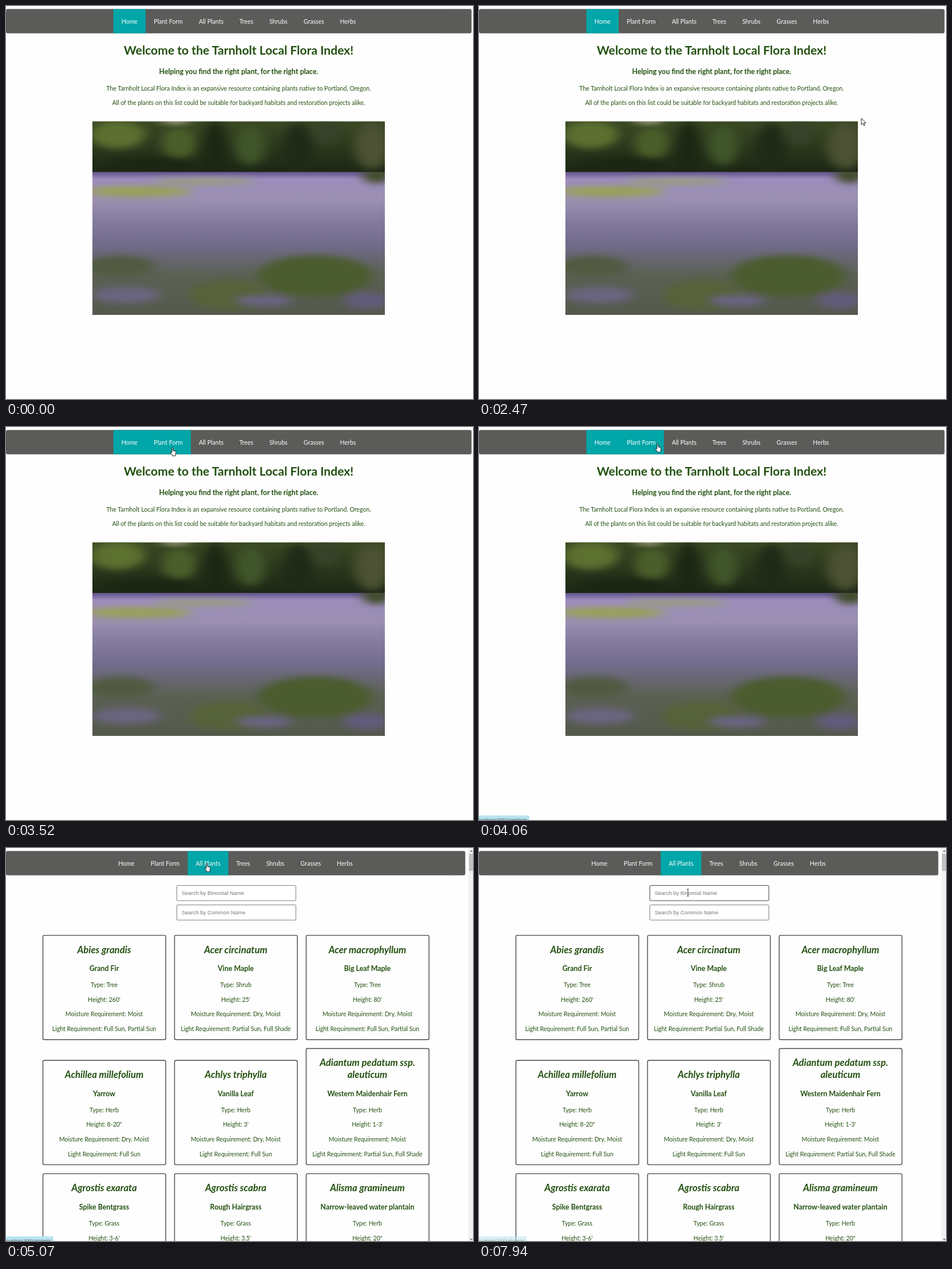
Write an HTML page that moves like this. It is 816 by 687 pixels and loops after 8 s.

```html
<!DOCTYPE html>
<html lang="en">
<head>
<meta charset="utf-8">
<title>Plant list</title>
<style>
  html, body { margin: 0; width: 816px; height: 687px; overflow: hidden; background: #fefefe; }
  svg { display: block; }
  text { font: 10.55px Lato, Carlito, sans-serif; fill: #22500f; text-anchor: middle; }
  .h1 { font-size: 21.1px; font-weight: 700; }
  .h2 { font-size: 16.7px; font-weight: 700; font-style: italic; }
  .h3 { font-size: 12.4px; font-weight: 700; }
  .nav { fill: #fff; }
  .hint { font: 9.45px "Liberation Sans", Arial, sans-serif; fill: #757575; text-anchor: start; }
  .status { font: 7.3px "Open Sans", sans-serif; fill: #3b5560; text-anchor: start; }
  .card { fill: none; stroke: #484848; stroke-width: 1.4; }
  .field { fill: #fff; stroke: #808080; }
</style>
</head>
<body>
<svg id="stage" width="816" height="687" viewBox="0 0 816 687">
  <defs>
    <linearGradient id="meadow" x2="0" y2="1">
      <stop offset="0" stop-color="#5f5088"/>
      <stop offset=".05" stop-color="#9c8dbd"/>
      <stop offset=".2" stop-color="#9a8fb0"/>
      <stop offset=".35" stop-color="#847a9f"/>
      <stop offset=".5" stop-color="#726c8c"/>
      <stop offset=".72" stop-color="#5c6154"/>
      <stop offset="1" stop-color="#54594c"/>
    </linearGradient>
    <linearGradient id="wood" x2="0" y2="1">
      <stop offset="0" stop-color="#3b4a24"/>
      <stop offset="1" stop-color="#1c2715"/>
    </linearGradient>
    <filter id="soft" x="-50%" y="-100%" width="200%" height="300%" color-interpolation-filters="sRGB">
      <feGaussianBlur stdDeviation="10 6"/>
    </filter>
    <clipPath id="woodFrame"><rect x="151" y="201.5" width="511" height="88.5"/></clipPath>
    <clipPath id="meadowFrame"><rect x="151" y="290" width="511" height="250"/></clipPath>
  </defs>
  <g id="home"></g>
  <g id="list"></g>
  <g id="status">
    <path id="tab" fill="#b9e4ef"/>
    <text id="url" class="status" x="-2" y="689"></text>
  </g>
  <circle id="click" cx="350" cy="27" r="8" fill="#a4d62c" opacity=".75"/>
  <path id="cursor" stroke-linejoin="round"/>
</svg>
<script>
const $ = id => document.getElementById(id);
const text = (x, y, s, cls = '') => `<text x="${x}" y="${y}" class="${cls}">${s}</text>`;
const rect = (x, y, w, h, attrs) => `<rect x="${x}" y="${y}" width="${w}" height="${h}" ${attrs}/>`;

// Navigation bar
const tabs = ['Home', 'Plant Form', 'All Plants', 'Trees', 'Shrubs', 'Grasses', 'Herbs'];
const edges = [187.7, 244, 323, 394, 446, 506, 570, 625];
const nav = (width, shift) => rect(0, 5.3, width, 42.5, 'rx="3" fill="#5b5b59"') +
  tabs.map((name, i) =>
    rect(edges[i] + shift, 5.3, edges[i + 1] - edges[i], 42.5, 'class="tab" fill="#00a6a8"') +
    text((edges[i] + edges[i + 1]) / 2 + shift, 30.5, name, 'nav')).join('');

// Landscape picture: soft patches as [x, y, rx, ry, colour]
const patches = list => list.map(([x, y, rx, ry, c]) =>
  `<ellipse cx="${x}" cy="${y}" rx="${rx}" ry="${ry}" fill="${c}" filter="url(#soft)"/>`).join('');
const trees = patches([
  [195, 225, 48, 24, '#5c7030'], [302, 240, 30, 28, '#4b5e2a'], [366, 250, 20, 50, '#1c2613'],
  [427, 244, 26, 34, '#40562a'], [510, 250, 26, 45, '#1f2a18'], [560, 222, 22, 22, '#36432a'],
  [640, 245, 32, 40, '#4c5233'], [296, 200, 26, 4, '#d8d6b0'], [250, 278, 80, 12, '#1c2613']
]);
const grass = patches([
  [230, 324, 95, 9, '#98a152'], [345, 307, 90, 5, '#98a070'], [648, 296, 26, 14, '#434d2c'],
  [540, 472, 100, 36, '#4b5c2e'], [390, 505, 70, 26, '#566239'], [200, 455, 60, 18, '#505a40'],
  [210, 505, 60, 14, '#6a6580'], [450, 515, 50, 10, '#6a6484'], [630, 515, 40, 14, '#625b7c']
]);

$('home').innerHTML = nav(813.5, 0) +
  text(406.5, 84.5, 'Welcome to the Tarnholt Local Flora Index!', 'h1') +
  text(406.5, 119, 'Helping you find the right plant, for the right place.', 'h3') +
  text(406.5, 147.5, 'The Tarnholt Local Flora Index is an expansive resource containing plants native to Portland, Oregon.') +
  text(406.5, 172.5, 'All of the plants on this list could be suitable for backyard habitats and restoration projects alike.') +
  `<g clip-path="url(#woodFrame)">${rect(151, 201.5, 511, 88.5, 'fill="url(#wood)"')}${trees}</g>
   <g clip-path="url(#meadowFrame)">${rect(151, 290, 511, 250, 'fill="url(#meadow)"')}${grass}</g>`;

// Plant cards: binomial (| breaks the line), common name, type, height, moisture, light
const plants = [
  ['Abies grandis', 'Grand Fir', 'Tree', "260'", 'Moist', 'Full Sun, Partial Sun'],
  ['Acer circinatum', 'Vine Maple', 'Shrub', "25'", 'Dry, Moist', 'Partial Sun, Full Shade'],
  ['Acer macrophyllum', 'Big Leaf Maple', 'Tree', "80'", 'Dry, Moist', 'Full Sun, Partial Sun'],
  ['Achillea millefolium', 'Yarrow', 'Herb', '8-20"', 'Dry, Moist', 'Full Sun'],
  ['Achlys triphylla', 'Vanilla Leaf', 'Herb', "3'", 'Dry, Moist', 'Full Sun'],
  ['Adiantum pedatum ssp.|aleuticum', 'Western Maidenhair Fern', 'Herb', "1-3'", 'Moist', 'Partial Sun, Full Shade'],
  ['Agrostis exarata', 'Spike Bentgrass', 'Grass', "3-6'", 'Moist', 'Full Sun'],
  ['Agrostis scabra', 'Rough Hairgrass', 'Grass', "3.5'", 'Dry, Moist', 'Full Sun'],
  ['Alisma gramineum', 'Narrow-leaved water plantain', 'Herb', '20"', 'Wet', 'Full Sun']
];
const labels = ['Type', 'Height', 'Moisture Requirement', 'Light Requirement'];
const card = ([binomial, common, ...facts], i) => {
  const x = 171.5 + i % 3 * 230, y = [0, 218.6, 416.8][Math.floor(i / 3)];
  const lines = binomial.split('|'), extra = (lines.length - 1) * 20.7;
  return rect(x - 107, 152.6 + y - extra, 214.6, 182.4 + extra, 'rx="2.5" class="card"') +
    lines.map((s, k) => text(x, 183.5 + y - extra + k * 20.7, s, 'h2')).join('') +
    text(x, 215.3 + y, common, 'h3') +
    facts.map((s, k) => text(x, 243.2 + y + k * 25.6, `${labels[k]}: ${s}`)).join('');
};
const field = (y, kind) => rect(298.5, y, 208, 26.5, 'rx="1" class="field"') +
  text(307, y + 16.5, `Search by ${kind} Name`, 'hint');

$('list').innerHTML = nav(802.5, -5.5) + field(65.5, 'Binomial') + field(99.5, 'Common') +
  plants.map(card).join('') +
  rect(808, 0, 8, 687, 'fill="#f1f1f1"') + rect(809, 10, 7, 30, 'fill="#c1c1c1"') +
  '<path d="M810.5 6.5l2.5-3 2.5 3zM810.5 683l2.5 3 2.5-3z" fill="#777"/>';

const homeTabs = document.querySelectorAll('#home .tab');
document.querySelectorAll('#list .tab').forEach((el, i) => el.setAttribute('opacity', +(i === 2)));
const firstField = document.querySelector('.field');

// Pointer moves: start, end, steps, target x, target y, easing power
const moves = [
  [650, 1400, 12, 678, 233, 1], [1470, 1540, 2, 670, 197, .8],
  [2470, 3240, 12, 390, 59, 2], [3310, 3520, 4, 291, 36, .6],
  [3720, 3790, 2, 288, 31, 1], [3990, 4410, 7, 351, 27, .77],
  [7590, 7940, 6, 365, 78, 1]
];
function pointer(t) {
  let x = 806, y = 716;
  for (const [start, end, steps, tx, ty, power] of moves) {
    if (t < start) break;
    const step = Math.floor((t - start) / (end - start) * (steps - 1) + 1e-6) + 1;
    const p = Math.min(1, step / steps) ** power;
    x += (tx - x) * p;
    y += (ty - y) * p;
  }
  return [x, y];
}

const shapes = {
  arrow: 'M0 0V11.5L2.7 9 4.5 13 6.2 12.2 4.5 8.4H8Z',
  hand: 'M-1 1Q-1 0 0 0T1 1V5.2L5 6.2Q6 6.5 6 7.8L5.2 12V14.5H-.5V13.2L-3.6 9Q-3.6 7.4-2.2 8L-1 9Z',
  beam: 'M-2-6H2M0-6V6M-2 6H2'
};
const show = (el, on) => el.setAttribute('visibility', on ? 'visible' : 'hidden');

function draw(t) {
  const onList = t >= 5070;
  const [x, y] = pointer(t);
  const inField = onList && y > 65 && y < 93;
  const hover = y < 48 ? edges.findIndex((e, i) => x >= e && x < edges[i + 1]) : -1;
  const shape = hover >= 0 ? 'hand' : inField ? 'beam' : 'arrow';

  $('home').style.display = onList ? 'none' : '';
  $('list').style.display = onList ? '' : 'none';
  homeTabs.forEach((el, i) => el.setAttribute('opacity', +(i === 0 || i === hover)));
  firstField.style.stroke = inField ? '#484848' : '';

  const form = t < 4130;
  $('tab').setAttribute('d', `M0 679H${form ? 86 : 81}q2 0 2 2V687H0Z`);
  $('url').textContent = 'localhost:3000/' + (form ? 'plantform' : 'allplants');
  $('status').setAttribute('opacity', t < 3720 ? 0 : t < 3790 ? .6 : t < 7870 ? 1 : t < 7940 ? .8 : .55);

  show($('click'), t >= 4940 && !onList);
  const cursor = $('cursor');
  show(cursor, t >= 650);
  cursor.setAttribute('d', shapes[shape]);
  cursor.setAttribute('fill', shape === 'beam' ? 'none' : '#fff');
  cursor.setAttribute('stroke', shape === 'beam' ? '#333' : '#111');
  cursor.setAttribute('stroke-width', .9);
  cursor.setAttribute('transform', `translate(${x} ${y})`);
}

const begin = performance.now();
function tick() {
  draw((performance.now() - begin) % 8000);
  requestAnimationFrame(tick);
}
tick();
</script>
</body>
</html>
```
